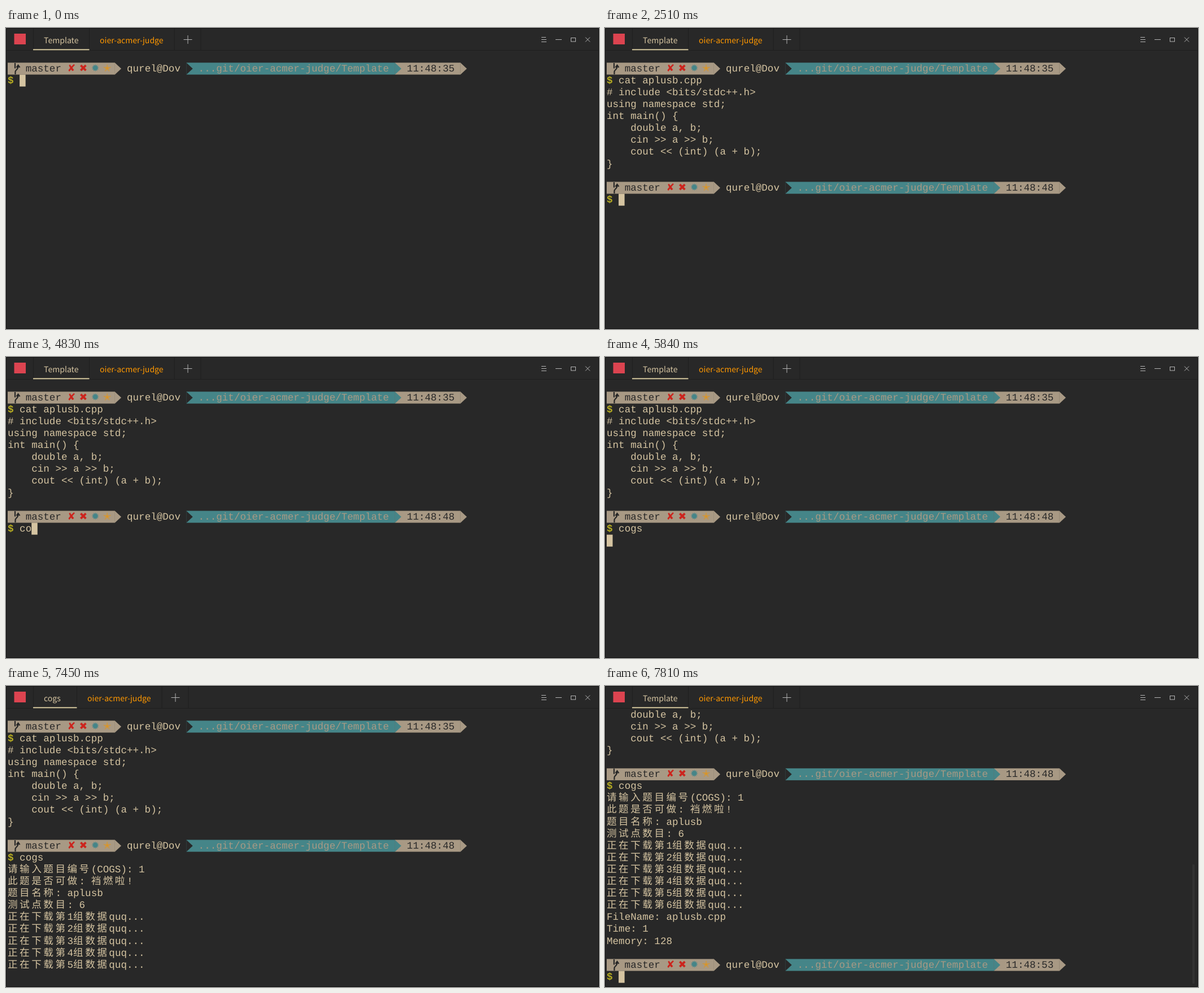
These frames come from a looping animation (1050x533 px, 8 s). An HTML page:

```html
<!DOCTYPE html>
<html lang="en">
<head>
<meta charset="utf-8">
<title>Terminal</title>
<style>
  html, body { margin: 0; width: 100%; height: 100%; overflow: hidden; background: #282828; }
  svg { display: block; width: 100vw; height: 100vh; }
  /* The invisible rotation keeps fractional baselines from snapping to whole pixels. */
  text { white-space: pre; text-rendering: geometricPrecision; transform: rotate(.002deg); }
  .mono { font: 17.58px "Liberation Mono", monospace; }
  .bold { font-weight: bold; }
  .cjk { font: 17.58px "Noto Sans CJK SC", "Noto Sans CJK", sans-serif; letter-spacing: 3.52px; }
  .sign { font: 17.58px "DejaVu Sans", sans-serif; }
  .tab { font: 14.07px "Noto Sans CJK SC", "Noto Sans CJK", sans-serif; }
</style>
</head>
<body>
<svg id="stage" viewBox="0 0 1050 533">
  <defs><clipPath id="view"><rect x="1" y="40" width="1048" height="492"/></clipPath></defs>
  <rect width="1050" height="533" fill="#282828"/>
  <g id="screen" clip-path="url(#view)"></g>
  <rect x="1" y="39" width="1048" height="1" fill="#1f1f1f"/>
  <rect x="14.5" y="10" width="20.5" height="19" fill="#dc4450"/>
  <g id="tabs"></g>
  <g fill="none" stroke="#b4b4b4">
    <path d="M948 16.5h8M948 20.5h9M948 24.5h9M973 20.5h11"/>
    <rect x="1000.5" y="17.5" width="8" height="6.5"/>
    <path d="M1026 16.5l8 8m0-8l-8 8"/>
  </g>
  <rect x=".5" y=".5" width="1049" height="532" rx="2" fill="none" stroke="#111"/>
</svg>
<script>
const CELL = 10.55, ROW = 21.1, LEFT = 3, TOP = 61.4, BASELINE = 15.3, LAST_ROW = 21, LOOP = 8000;
const C = { bg: '#282828', fg: '#d5c4a1', tan: '#a89984', teal: '#458588',
            red: '#cc241d', star: '#e0951c', dollar: '#b8ae22', tab: '#ff9800' };

const lines = [
  'prompt 11:48:35', '$ cat aplusb.cpp',
  '# include <bits/stdc++.h>', 'using namespace std;', 'int main() {',
  '    double a, b;', '    cin >> a >> b;', '    cout << (int) (a + b);', '}', '',
  'prompt 11:48:48', '$ cogs',
  '请输入题目编号(COGS): 1', '此题是否可做: 裆燃啦!', '题目名称: aplusb', '测试点数目: 6',
  ...[1, 2, 3, 4, 5, 6].map(n => `正在下载第${n}组数据quq...`),
  'FileName: aplusb.cpp', 'Time: 1', 'Memory: 128', '', 'prompt 11:48:53', '$ '
];

// [start ms, current row, text on that row, cursor shown, first tab title]
const HOME = 'Template', RUN = 'cogs', ask = '请输入题目编号(COGS): ';
const states = [
  [0, 1, '$ ', 1, HOME], [40, 1, '$ ', 0, HOME], [610, 1, '$ ', 1, HOME],
  [660, 1, '$ c', 1, HOME], [800, 1, '$ ca', 1, HOME], [960, 1, '$ cat', 1, HOME],
  [1090, 1, '$ cat ', 1, HOME], [1630, 1, '$ cat c', 1, HOME],
  [1830, 1, '$ cat aplusb.cpp ', 1, HOME],
  [2380, 2, '', 1, HOME], [2420, 9, '', 1, HOME], [2470, 11, '', 1, HOME],
  [2510, 11, '$ ', 1, HOME], [3010, 11, '$ ', 0, HOME], [3610, 11, '$ ', 1, HOME],
  [4200, 11, '$ ', 0, HOME], [4690, 11, '$ ', 1, HOME], [4760, 11, '$ c', 1, HOME],
  [4830, 11, '$ co', 1, HOME], [5160, 11, '$ cog', 1, HOME], [5230, 11, '$ cogs', 1, HOME],
  [5800, 12, '', 1, HOME], [5850, 12, '', 1, RUN], [5950, 12, ask, 1, RUN],
  [6390, 12, ask, 0, RUN], [6480, 12, ask + '1', 1, RUN], [6640, 13, '', 1, RUN],
  [7210, 13, '', 0, RUN], [7250, 17, '', 0, RUN], [7300, 18, '', 0, RUN],
  [7350, 19, '', 0, RUN], [7400, 20, '', 0, RUN], [7450, 21, '', 0, RUN],
  [7490, 22, '', 0, RUN], [7560, 25, '', 0, RUN], [7640, 25, '', 0, HOME],
  [7730, 27, '', 1, HOME], [7810, 27, '$ ', 1, HOME]
];

const screen = document.getElementById('screen'), tabs = document.getElementById('tabs');
const colX = col => LEFT + col * CELL;
const rowY = row => TOP + row * ROW;
const columns = text => [...text].reduce((n, ch) => n + (ch > '\u2e80' ? 2 : 1), 0);

function add(parent, tag, attrs, content = '') {
  const el = document.createElementNS('http://www.w3.org/2000/svg', tag);
  for (const key in attrs) el.setAttribute(key, attrs[key]);
  el.textContent = content;
  parent.appendChild(el);
}

function write(col, row, content, fill = C.fg, style = 'mono') {
  add(screen, 'text', { x: colX(col), y: rowY(row) + BASELINE, fill, class: style }, content);
}

function block(from, to, row, fill) {
  add(screen, 'rect', { x: colX(from), y: rowY(row), width: (to - from) * CELL, height: ROW, fill });
}

function arrow(col, row, fill) {
  add(screen, 'path', { d: `M${colX(col) - .1} ${rowY(row)}l11.3 ${ROW / 2}l-11.3 ${ROW / 2}z`, fill });
}

function drawPrompt(row, clock) {
  block(0, 18, row, C.tan);
  block(30, 65, row, C.teal);
  block(65, 76, row, C.tan);
  arrow(18, row, C.tan);
  arrow(30, row, C.bg);
  arrow(65, row, C.teal);
  arrow(76, row, C.tan);
  add(screen, 'path', {
    d: 'M16 .5v9.5M16.5 20.5v-4C16.5 12 21.5 13 21.5 6M18.5 8.5l3-4l3 4',
    transform: `translate(0 ${rowY(row)})`, fill: 'none', stroke: C.bg, 'stroke-width': 2.2
  });
  write(3, row, 'master', C.bg);
  [['✘', C.red], ['✖', C.red], ['✹', C.teal], ['✭', C.star]]
    .forEach(([mark, fill], i) => write(10 + 2 * i, row, mark, fill, 'sign'));
  write(20, row, 'qurel@Dov');
  write(32, row, '...git/oier-acmer-judge/Template', C.tan);
  write(67, row, clock, C.bg);
}

function drawLine(text, row) {
  if (text.startsWith('prompt')) return drawPrompt(row, text.slice(7));
  if (text.startsWith('$')) {
    write(0, row, '$', C.dollar, 'mono bold');
    return write(2, row, text.slice(2));
  }
  let col = 0;
  for (const run of text.match(/[\u2e80-\uffff]+|[^\u2e80-\uffff]+/g) || []) {
    write(col, row, run, C.fg, run > '\u2e80' ? 'cjk' : 'mono');
    col += columns(run);
  }
}

function drawTabs(title) {
  tabs.replaceChildren();
  const end = title === HOME ? 147.5 : 125.5;
  for (const x of [48.5, end, end + 150.5, end + 197.5])
    add(tabs, 'path', { d: `M${x} 1V39`, stroke: '#1f1f1f' });
  add(tabs, 'rect', { x: 48, y: 37.4, width: end - 48, height: 1.9, fill: '#ddd0a4' });
  add(tabs, 'text', { x: 67, y: 26.5, fill: C.fg, class: 'tab' }, title);
  add(tabs, 'text', { x: end + 18.5, y: 26.5, fill: C.tab, class: 'tab' }, 'oier-acmer-judge');
  add(tabs, 'path', { d: `M${end + 167} 20.5h15m-7.5-7.5v15`, stroke: '#b4b4b4' });
}

function draw([, current, text, cursor, title]) {
  screen.replaceChildren();
  const scroll = Math.max(0, current - LAST_ROW);
  for (let i = Math.max(0, scroll - 1); i < current; i++) drawLine(lines[i], i - scroll);
  drawLine(text, current - scroll);
  if (cursor) {
    const col = columns(text);
    block(col, col + 1, current - scroll, C.fg);
  }
  if (scroll) add(screen, 'rect', { x: 1040, y: 316, width: 4, height: 211, rx: 1, fill: '#323232' });
  drawTabs(title);
}

let shown;
const start = performance.now();
function tick(now) {
  const t = Math.max(0, now - start) % LOOP;
  const state = states.findLast(s => s[0] <= t);
  if (state !== shown) draw(shown = state);
  requestAnimationFrame(tick);
}
tick(start);
</script>
</body>
</html>
```
